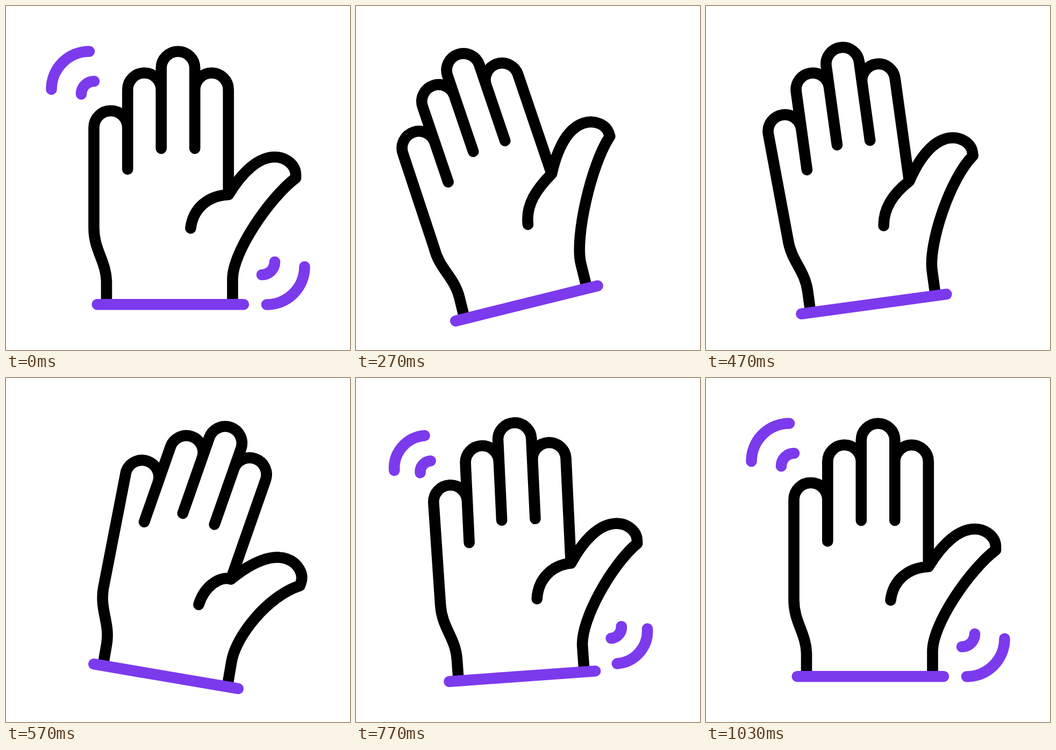
These frames come from a looping animation (640 by 640 pixels, 1.67 s). An HTML page:

```html
<!DOCTYPE html>
<html>
<head>
<meta charset="utf-8">
<title>Waving hand</title>
<style>
html, body { margin: 0; height: 100%; overflow: hidden; background: #fff; }
svg { display: block; width: 100vw; height: 100vh; }
path { fill: none; stroke: #7c3aed; stroke-width: 20.6; stroke-linecap: round; stroke-linejoin: round; vector-effect: non-scaling-stroke; }
#hand { stroke: #000; }
</style>
</head>
<body>
<svg viewBox="0 0 640 640">
  <g id="all">
    <path id="hand"/>
    <path d="M169.7 555.3H442"/>
    <g id="marks">
      <path id="left" d="M84.5 155A70.5 70.5 0 0 1 155 84.5M140 164A24 24 0 0 1 164 140"/>
      <path id="right" d="M555.5 485A70.5 70.5 0 0 1 485 555.5M500 476A24 24 0 0 1 476 500"/>
    </g>
  </g>
</svg>
<script>
const LOOP = 1670, FPS = 30;
const $ = id => document.getElementById(id);
const set = (id, name, value) => $(id).setAttribute(name, value);

// Times are in frames; each track is a list of [time, value].
const TILT = [[3.85, 0], [10.85, -20], [17.7, 10], [24.4, -5], [31, 0]];
const BEND_LEFT = [[3.85, 0], [10.85, 1], [17.7, 0]];
const BEND_RIGHT = [[10.85, 0], [17.7, 1], [25.2, 0]];
const GROW = [[17.7, 0], [25.2, 1]];

function ease(u) {
  u = Math.min(1, Math.max(0, u));
  return u < .5 ? (2 * u) ** 2.4 / 2 : 1 - (2 - 2 * u) ** 2.4 / 2;
}

function track(n, keys) {
  return keys.slice(1).reduce((sum, [t, v], i) => {
    const [t0, v0] = keys[i];
    return sum + (v - v0) * ease((n - t0) / (t - t0));
  }, keys[0][1]);
}

// Offset of a point turned by deg around (cx, cy)
function turn(x, y, cx, cy, deg) {
  const r = deg * Math.PI / 180, c = Math.cos(r) - 1, s = Math.sin(r);
  x -= cx;
  y -= cy;
  return [x * c - y * s, x * s + y * c];
}

// Fingers and thumb bend; wrist and palm crease stay.
function handPath(a, b) {
  const p = (x, y) => {
    const l = turn(x, y, 190, 395, -7), r = turn(x, y, 368.5, 241, 9.8);
    return (x + a * l[0] + b * r[0]).toFixed(2) + ' ' + (y + a * l[1] + b * r[1]).toFixed(2) + ' ';
  };
  // The small radius grows to a half circle across the gap.
  const finger = (x0, x1, y, end) =>
    `L${p(x0, y)}A30 30 0 0 1 ${p(x1, y)}L${p(x1, end)}`;
  return 'M187 550V515C187 475 163.5 455 163.5 413' +
    finger(163.5, 226.3, 226.3, 303.7) +
    finger(226.3, 288.8, 155.7, 265) +
    finger(288.8, 351.3, 115.7, 265) +
    finger(351.3, 413.8, 155.7, 351) +
    `M343.5 413.5C348 377 375 ${'353'} ${p(414, 351)}` +
    `C${p(440, 308)}${p(470, 281)}${p(500, 281)}` +
    `C${p(521, 281)}${p(539, 296)}${p(539, 314)}L${p(539, 320)}` +
    `C${p(490, 357)}421.5 458 421.5 508V550`;
}

function draw() {
  const n = Math.floor(performance.now() % LOOP * FPS / 1000 + .15);
  set('all', 'transform', `rotate(${track(n, TILT)} 303 506.5)`);
  set('hand', 'd', handPath(track(n, BEND_LEFT), track(n, BEND_RIGHT)));

  const leaving = n < 6, k = leaving ? (n / 4) ** 1.4 : 0;
  const size = leaving ? 1 : track(n, GROW);
  const place = (id, at, dx, dy) => set(id, 'transform',
    `translate(${at + dx * k} ${at + dy * k}) scale(${size}) translate(${-at} ${-at})`);
  place('left', 165, -23.3, -20.3);
  place('right', 475, 32, 26.8);
  set('marks', 'visibility', leaving || n > 18 ? 'visible' : 'hidden');
  requestAnimationFrame(draw);
}
draw();
</script>
</body>
</html>
```
